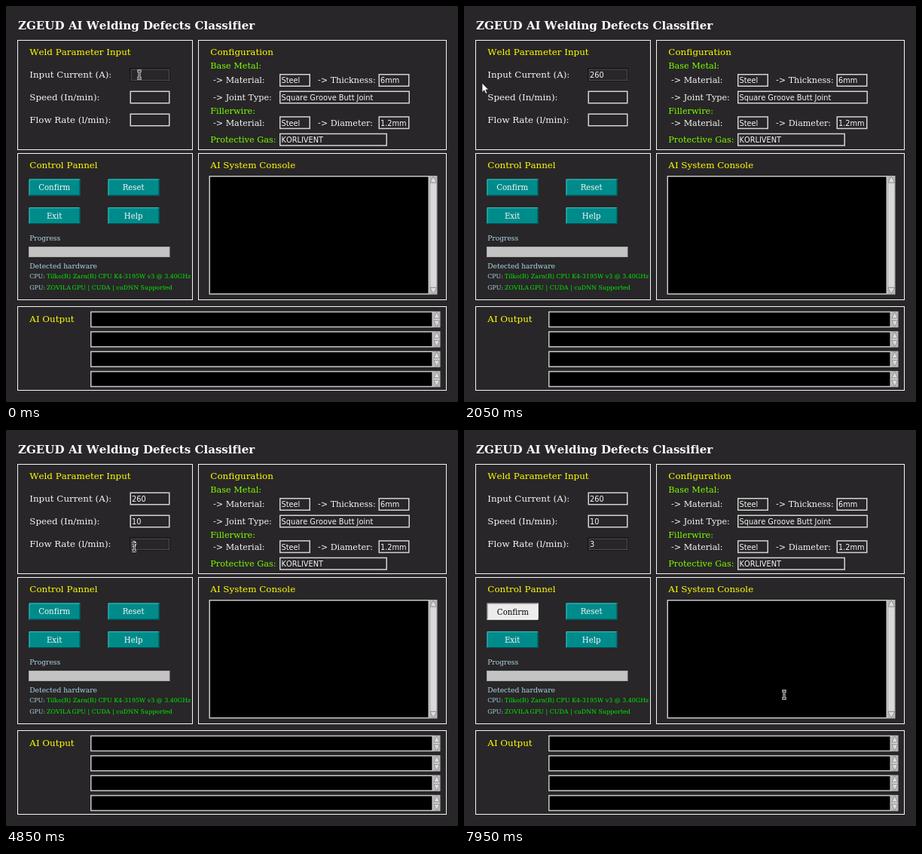
These frames come from a looping animation (600x525 px, 8 s). An HTML page:

```html
<!DOCTYPE html>
<html lang="en">
<head>
<meta charset="utf-8">
<title>Welding Defects Classifier</title>
<style>
html, body { margin: 0; width: 100%; height: 100%; overflow: hidden; background: #282628; }
svg { display: block; width: 600px; height: 525px; }
text {
  font-family: "DejaVu Serif", serif; white-space: pre;
  font-kerning: none; font-variant-ligatures: none;
}
.entry { font-family: "DejaVu Sans", sans-serif; }
</style>
</head>
<body>
<svg id="stage" viewBox="0 0 600 525"></svg>
<script>
const LOOP = 8000, STEP = 50;
const BACK = '#282628', WHITE = '#f6f6f6', YELLOW = '#ffff00', GREEN = '#7cfc00', BLUE = '#add8e6', LIME = '#00ee00';
const stage = document.getElementById('stage');

function add(tag, attrs, parent = stage) {
  const el = document.createElementNS('http://www.w3.org/2000/svg', tag);
  for (const k in attrs) el.setAttribute(k, attrs[k]);
  parent.appendChild(el);
  return el;
}
const box = (x, y, r, b, fill, stroke = 'none', width = 1) =>
  add('rect', { x, y, width: r - x, height: b - y, fill, stroke, 'stroke-width': width });
const path = (d, fill, stroke = 'none', width = 1, parent = stage) =>
  add('path', { d, fill, stroke, 'stroke-width': width }, parent);
function label(text, x, y, size, fill, attrs = {}) {
  const el = add('text', { x, y, 'font-size': size, fill, ...attrs });
  el.textContent = text;
  return el;
}

box(0, 0, 600, 525, BACK);
const bold = { 'font-weight': 'bold' };
label('ZGEUD', 16, 31, 15.05, '#fff', bold);
label('AI Welding Defects Classifier', 82.9, 31, 15.05, '#fff', bold);

// Panels
for (const [x, y, r, b] of [[15, 45, 247, 190], [255, 45, 584, 190], [15, 195, 247, 389],
  [255, 195, 584, 389], [15, 398, 584, 509]])
  box(x + .5, y + .5, r + .5, b + .5, 'none', WHITE);

for (const [text, x, y] of [['Weld Parameter Input', 31.3, 65], ['Configuration', 271.3, 65],
  ['Control Pannel', 31.3, 215], ['AI System Console', 271.3, 215], ['AI Output', 31.3, 419]])
  label(text, x, y, 11.9, YELLOW);
['Input Current (A):', 'Speed (In/min):', 'Flow Rate (l/min):'].forEach((text, i) =>
  label(text, 31.3, 95 + 30 * i, 11.85, WHITE));
for (const [text, y] of [['Base Metal:', 83], ['Fillerwire:', 143], ['Protective Gas:', 181]])
  label(text, 271.3, y, 11.25, GREEN);
for (const [text, x, y] of [['Material:', 275, 102], ['Thickness:', 414, 102],
  ['Joint Type:', 275, 124.5], ['Material:', 275, 158.5], ['Diameter:', 414, 158.5]])
  label('-> ' + text, x, y, 11.15, WHITE);

// Entry fields
const hotspots = [[271, 226, 561, 381]];
function entry(x, y, r, text) {
  const b = y + 17;
  hotspots.push([x, y, r, b]);
  const frame = box(x + .75, y + .75, r - .75, b - .75, BACK, '#d4d4d4', 1.5);
  const inner = box(x + 1.5, y + 1.5, r - .8, b - .8, 'none', '#808080', .6);
  const value = label(text, x + 2.5, y + 12.3, 9.8, WHITE, { class: 'entry' });
  const focus = on => {
    frame.setAttribute('stroke', on ? '#050505' : '#d4d4d4');
    inner.setAttribute('visibility', on ? 'visible' : 'hidden');
  };
  focus(false);
  return { focus, value };
}
const inputs = [82.5, 112.5, 142.5].map(y => entry(164.5, y, 217.5, ''));
entry(363, 90, 404, 'Steel');
entry(494.5, 90, 535.5, '6mm');
entry(363, 112.5, 536, 'Square Groove Butt Joint');
entry(363, 146.2, 404, 'Steel');
entry(494.5, 146.2, 535.5, '1.2mm');
entry(363, 168.7, 506, 'KORLIVENT');

// Buttons
function button(x, y, text) {
  const r = x + 68, b = y + 22;
  const face = box(x, y, r, b, '#008b8b');
  const light = path(`M${x + .5} ${b}V${y + .5}H${r}`, 'none', '#3fc4c4');
  const dark = path(`M${x} ${b - .5}H${r - .5}V${y}`, 'none', '#004c4c');
  const title = label(text, x + 33.7, y + 14.5, 10.2, WHITE, { 'text-anchor': 'middle' });
  return (active, pressed) => {
    face.setAttribute('fill', active ? '#ececec' : '#008b8b');
    light.setAttribute('stroke', active ? (pressed ? '#777' : '#fff') : '#3fc4c4');
    dark.setAttribute('stroke', active ? (pressed ? '#fff' : '#777') : '#004c4c');
    title.setAttribute('fill', active ? '#000' : WHITE);
    title.setAttribute('transform', pressed ? 'translate(.7 1)' : '');
  };
}
const confirm = button(30.5, 229.5, 'Confirm');
button(135.5, 229.5, 'Reset');
button(30.5, 267, 'Exit');
button(135.5, 267, 'Help');

label('Progress', 31.2, 311, 9.15, BLUE);
box(30.5, 319.5, 217, 332.5, '#c3c3c3', '#adadad');
label('Detected hardware', 31.2, 348, 9.2, BLUE);
label('CPU:', 31.2, 361, 7.95, BLUE);
label('Tilko(R) Zarn(R) CPU K4-3195W v3 @ 3.40GHz', 54, 361, 7.95, LIME);
label('GPU:', 31.2, 376.2, 7.95, BLUE);
label('ZOVILA', 54, 376.2, 7.95, LIME);
label('GPU | CUDA | cuDNN Supported', 87.6, 376.2, 7.95, LIME);

// Text areas with scrollbars
function scroller(x, y, r, b, w, h) {
  const e = r + w, m = r + w / 2;
  box(x + .75, y + .75, r - .75, b - .75, '#000', '#c8c8c8', 1.5);
  box(r, y, e, b, '#b6b6b6');
  box(r + 1.5, y + h + 1, e - 1.5, b - h - 1, '#d9d9d9');
  path(`M${m} ${y + 1}L${e - 1} ${y + h}H${r + 1}Z`, '#dedede', '#818181', .7);
  path(`M${m} ${b - 1}L${e - 1} ${b - h}H${r + 1}Z`, '#dedede', '#818181', .7);
}
scroller(269.5, 225, 562, 382.5, 10.5, 9);
for (let i = 0; i < 4; i++) scroller(112, 404.8 + 26.35 * i, 567, 426.2 + 26.35 * i, 9.5, 9);

// Pointer shapes
const arrow = path('M0 0V12.4L2.8 9.8L4.9 14.3L6.9 13.4L4.9 9.1H8.6Z', '#fff', '#111', .7);
const beam = add('g', {});
const beamLine = 'M-3-5H-1Q0-5 0-4Q0-5 1-5H3M0-4V4M-3 5H-1Q0 5 0 4Q0 5 1 5H3';
path(beamLine, 'none', '#fff', 2.9, beam);
path(beamLine, 'none', '#000', 1.1, beam);

// Pointer route: time, x, y
const route = [[0, 177, 91], [350, 177, 91], [850, 339, 88], [1300, 339, 88], [2000, 24, 102],
  [2400, 24, 102], [3050, 179, 118], [4150, 179, 118], [4450, 178, 149], [4800, 178, 149],
  [5100, 72, 238], [5250, 72, 238], [5600, 199, 339], [6000, 199, 339], [6600, 425, 351], [LOOP, 425, 351]];
function pointer(t) {
  const i = route.findIndex(p => p[0] > t);
  const [t0, x0, y0] = route[i - 1], [t1, x1, y1] = route[i];
  const u = (t - t0) / (t1 - t0), k = u * u * (3 - 2 * u);
  return [x0 + (x1 - x0) * k, y0 + (y1 - y0) * k];
}

const typed = [['260', [1150, 1400, 1650]], ['10', [3450, 3650]], ['3', [4700]]];
const focusAt = [0, 3100, 4450, Infinity];

function render(t) {
  const [x, y] = pointer(t);
  inputs.forEach((field, i) => {
    const [text, keys] = typed[i];
    field.value.textContent = text.slice(0, keys.filter(k => t >= k).length);
    field.focus(t >= focusAt[i] && t < focusAt[i + 1]);
  });
  const over = x > 30 && x < 98 && y > 230 && y < 251;
  confirm(over || t >= 5200, t >= 5200);
  const editing = hotspots.some(([l, u, r, b]) => x >= l && x <= r && y >= u && y <= b);
  arrow.setAttribute('visibility', editing ? 'hidden' : 'visible');
  beam.setAttribute('visibility', editing ? 'visible' : 'hidden');
  for (const el of [arrow, beam]) el.setAttribute('transform', `translate(${x} ${y})`);
}

const start = performance.now();
function tick() {
  const t = (performance.now() - start) % LOOP;
  render(Math.floor(t / STEP) * STEP);
  requestAnimationFrame(tick);
}
tick();
</script>
</body>
</html>
```
